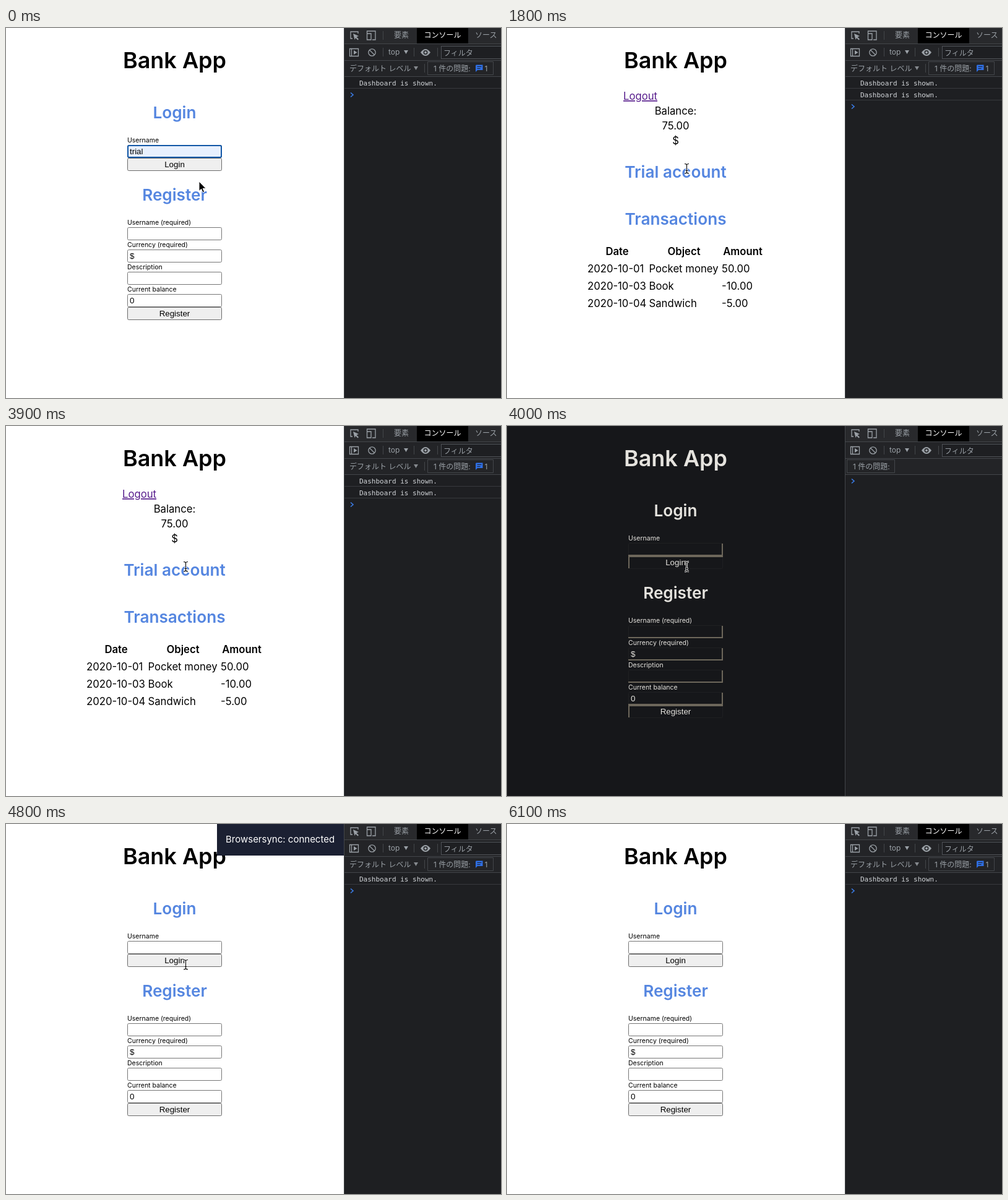
An HTML page for the animation above (6.2 s loop, 800 by 598 pixels).

```html
<!DOCTYPE html>
<html lang="en">
<head>
<meta charset="utf-8">
<title>Bank App</title>
<style>
  html, body { margin: 0; width: 100%; height: 100%; overflow: hidden; background: #fff; }
  svg { display: block; width: 100vw; height: 100vh; }
  text { font-family: Inter, "Noto Sans CJK JP", "Noto Sans CJK", sans-serif; white-space: pre; }
  .mid { text-anchor: middle; }

  #page { --bg: #fff; --ink: #000; --accent: #5586e0; fill: var(--ink); }
  #page.dark { --bg: #16171a; --ink: #e5e3de; --accent: #e5e3de; }
  .bg { fill: var(--bg); }
  .title { font-size: 36px; font-weight: 600; }
  .head { font-size: 26.2px; font-weight: 600; fill: var(--accent); }
  .label { font-size: 10.5px; }
  .body { font-size: 16.7px; }
  .th { font-weight: 600; }
  .link { fill: #551a8b; text-decoration: underline; }
  .value { font: 13.33px "Liberation Sans", Arial, sans-serif; }
  .field { fill: #fff; stroke: #767676; }
  .button { fill: #efefef; stroke: #6b6b6b; }
  .hover .button { fill: #e0e0e0; stroke: #4f4f4f; }
  .dark .field, .dark .button { fill: #16171a; stroke: #1f2022; }
  .bevel { display: none; fill: none; stroke: #6d675b; stroke-width: 2; }
  .dark .bevel { display: inline; }
  .dark .value { font-weight: 500; }

  #tools text { font-size: 12px; fill: #9aa0a6; }
  #tools .mono { font: 11px "DejaVu Sans Mono", monospace; fill: #d3d6da; }
  #tools .on { fill: #fff; }
  .icon { fill: none; stroke: #9aa0a6; stroke-width: 1.3; }
  .rule { fill: none; stroke: #43464a; }
  .row { fill: none; stroke: #37393d; }
  .prompt { fill: none; stroke: #3b7de8; stroke-width: 1.6; }
</style>
</head>
<body>
<svg viewBox="0 0 800 598" preserveAspectRatio="none">
  <g id="page">
    <rect class="bg" width="547" height="598"/>
    <text class="title mid" x="272.5" y="64.5">Bank App</text>
    <g id="forms"></g>
    <g id="dashboard"></g>
    <g id="toast">
      <rect x="341" width="206" height="51" fill="#1b2032"/>
      <text x="355" y="30" font-size="15" fill="#fff">Browsersync: connected</text>
    </g>
  </g>

  <g id="tools">
    <rect x="546" width="254" height="598" fill="#1e1f22"/>
    <rect x="547" width="253" height="25" fill="#28292c"/>
    <rect x="547" y="26" width="253" height="52" fill="#232427"/>
    <rect x="664" width="83" height="25" fill="#000"/>
    <path class="rule" d="M546.5 0V598M547 25.5H800M547 52.5H800M547 78.5H800
      M609.5 5V19M609.5 32V46M659.5 32V46M697.5 32V46"/>
    <rect class="rule" x="703.5" y="29.5" width="110" height="20" style="fill:#1e1f22;stroke:#4f5257"/>
    <path class="icon" d="M560 17H557V6H569V9M583.5 9V5H597V19H592M583.5 9H590V19H583.5Z
      M555.5 33.5H569.5V45.5H555.5ZM558.5 33.5V45.5"/>
    <path fill="#9aa0a6" d="M561 9L570 13L566.5 14.5L570 18L568.500 19.500L565 16L563.500 19Z M562 36L567.500 39.500L562 43Z
      M643 36H650L646.500 42Z"/>
    <path class="icon" d="M587.500 35.500L595.500 43.500"/>
    <circle class="icon" cx="591.500" cy="39.500" r="5.700"/>
    <path fill="#9aa0a6" d="M670 39.500Q678 28.500 686 39.500Q678 50.500 670 39.500Z"/>
    <circle cx="678" cy="39.500" r="2.700" fill="#9aa0a6" stroke="#232427" stroke-width="1.500"/>
    <text x="627" y="16">要素</text>
    <text class="on mid" x="705.500" y="16">コンソール</text>
    <text x="758" y="16">ソース</text>
    <text x="618" y="43">top</text>
    <text x="707" y="44.500">フィルタ</text>
    <g id="issues">
      <text x="555" y="69.500">デフォルト レベル</text>
      <path fill="#85898e" d="M659 62H666L662.500 68Z"/>
      <path class="rule" d="M676.500 58V72M681.500 54.500H787.500V75.500H681.500Z"/>
      <text x="691" y="69.500">1 件の問題:</text>
      <path fill="#2f6fe4" d="M760 59.500H770.500V68H762L759 71V60.500Z"/>
      <path stroke="#1e1f22" d="M761.500 62.500H768.500M761.500 65.500H766.500"/>
      <text x="773.500" y="69.500">1</text>
    </g>
    <g id="noIssues">
      <path class="rule" d="M549.500 54.500H626.500V75.500H549.500Z"/>
      <text x="559" y="69.500">1 件の問題:</text>
    </g>
    <g id="log1"><text class="mono" x="571" y="93">Dashboard is shown.</text><path class="row" d="M547 97.500H800"/></g>
    <g id="log2"><text class="mono" x="571" y="112">Dashboard is shown.</text><path class="row" d="M547 116.500H800"/></g>
    <path id="prompt" class="prompt" d="M557 85.500L561 89L557 92.500"/>
  </g>

  <path id="arrow" d="M0 0V15.500L3.600 12.200L6 17.800L8.600 16.700L6.200 11.300H11Z" fill="#000" stroke="#fff"/>
  <g id="beam" fill="none">
    <path id="beamShape" d="M-3.500 -7.500Q0 -7.500 0 -5.500Q0 -7.500 3.500 -7.500M0 -5.500V6M-3.500 8Q0 8 0 6Q0 8 3.500 8M-2 3.500H2" stroke="#fff" stroke-width="2.600"/>
    <use href="#beamShape"/>
    <path d="M-3.500 -7.500Q0 -7.500 0 -5.500Q0 -7.500 3.500 -7.500M0 -5.500V6M-3.500 8Q0 8 0 6Q0 8 3.500 8M-2 3.500H2" stroke="#000" stroke-width="1.100"/>
  </g>
</svg>
<script>
const LOOP = 6200, STEP = 100;
const DASHBOARD = 1800, RELOAD = 4000, READY = 4100, TOAST_END = 6000;
const CENTER = 272.5;

const $ = id => document.getElementById(id);
const show = (id, on) => { $(id).style.display = on ? '' : 'none'; };
const move = (id, x, y) => $(id).setAttribute('transform', `translate(${x} ${y})`);

const text = (cls, x, y, str) => `<text class="${cls}" x="${x}" y="${y}">${str}</text>`;
const centered = (cls, y, str, x = CENTER) => text(cls + ' mid', x, y, str);
const box = (cls, y) => `<rect class="${cls}" x="196.5" y="${y + .5}" width="152" height="20" rx="2"/>`;
const field = (label, y, value = '') => text('label', 196, y - 4, label) + box('field', y) +
  `<path class="bevel" d="M196 ${y + 20}H348V${y + 1}"/>` + text('value', 200, y + 15, value);
const button = (label, y) => box('button', y) +
  `<path class="bevel" d="M349 ${y + 1}H197V${y + 20}"/>` + centered('value', y + 15, label);

$('forms').innerHTML =
  centered('head', 145.5, 'Login') + field('Username', 189) +
  `<g id="login">${button('Login', 210)}</g>
  <g id="focus">
    <rect x="197" y="190" width="151" height="19" rx="2" fill="#e8f0fe" stroke="#1257a6" stroke-width="2"/>
    ${text('value', 200, 204, 'trial')}
    <path id="caret" d="M221.5 192V207" stroke="#000"/>
  </g>` +
  centered('head', 278.5, 'Register') + field('Username (required)', 322) +
  field('Currency (required)', 358, '$') + field('Description', 394) +
  field('Current balance', 430, '0') + button('Register', 451);

const columns = [130, 229.5, 347];
const rows = [
  ['2020-10-01', 'Pocket money', '50.00'],
  ['2020-10-03', 'Book', '-10.00'],
  ['2020-10-04', 'Sandwich', '-5.00'],
];
$('dashboard').innerHTML =
  text('body link', 188, 116, 'Logout') +
  ['Balance:', '75.00', '$'].map((s, i) => centered('body', 140 + i * 24, s)).join('') +
  centered('head', 241.5, 'Trial account') + centered('head', 317.5, 'Transactions') +
  centered('body th', 367, 'Date', 178) + centered('body th', 367, 'Object', 286) +
  centered('body th', 367, 'Amount', 381) +
  rows.map((row, r) => row.map((s, c) => text('body', columns[c], 395 + r * 28, s)).join('')).join('');

const progress = (t, from, to) => Math.min(1, Math.max(0, (t - from) / (to - from)));
const smooth = p => p * p * (3 - 2 * p);

function pointer(t) {
  const enter = smooth(progress(t, 100, 600)), leave = progress(t, 5100, 5500) ** 2;
  return [312 - 24 * enter + 42 * leave, 248 - 24 * enter + 376 * leave];
}

function draw(t) {
  const typed = t < DASHBOARD;
  const dash = !typed && t < RELOAD;
  const dark = t >= RELOAD && t < READY;
  const [x, y] = pointer(t);
  const beam = !typed && t <= 5100;

  $('page').classList.toggle('dark', dark);
  $('login').classList.toggle('hover', !beam && y < 231);
  show('forms', !dash);
  show('dashboard', dash);
  show('focus', typed);
  show('caret', t % 1000 >= 500);
  show('toast', t >= READY && t < TOAST_END);

  show('issues', !dark);
  show('noIssues', dark);
  show('log1', !dark);
  show('log2', dash);
  move('prompt', 0, dark ? 0 : dash ? 38 : 19);

  show('beam', beam);
  show('arrow', !beam && y < 598);
  move('beam', 290.5, 227);
  move('arrow', x, y);
}

function tick() {
  const t = performance.now() % LOOP;
  draw(Math.floor(t / STEP) * STEP);
  requestAnimationFrame(tick);
}
tick();
</script>
</body>
</html>
```
